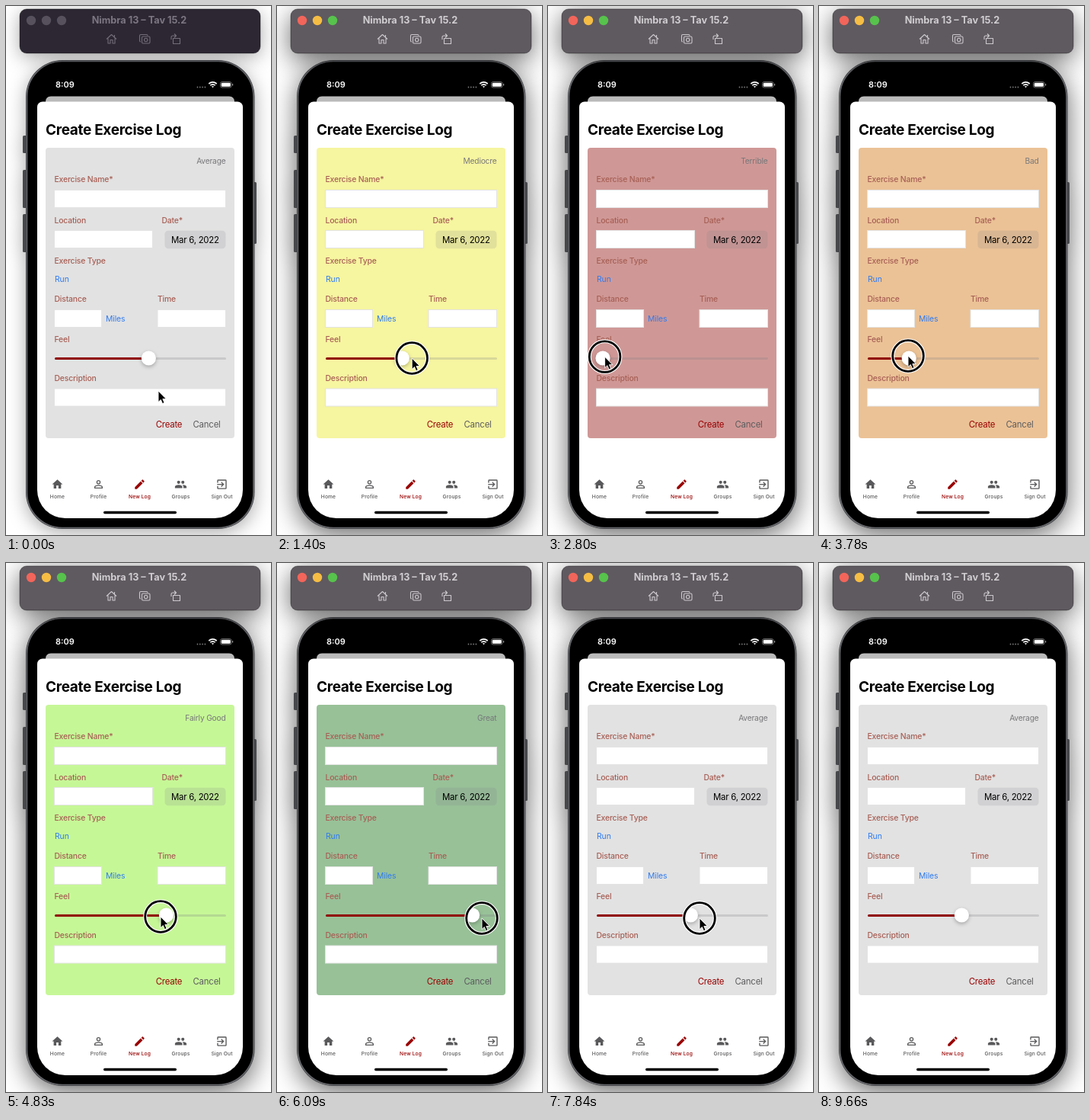
These frames come from a looping animation (348 px wide and 694 px high, 9.8 s). An HTML page:

```html
<!DOCTYPE html>
<html lang="en">
<head>
<meta charset="utf-8">
<title>Exercise log</title>
<style>
  html, body { margin: 0; width: 100%; height: 100%; overflow: hidden; background: #fff; }
  svg { display: block; font: 400 10.4px Inter, "Liberation Sans", sans-serif; }
  .label { font-weight: 500; letter-spacing: -.17px; fill: #a75f55; }
  .link { fill: #2f7bf0; letter-spacing: -.1px; }
  .button { font-size: 11.4px; letter-spacing: -.2px; }
  .field { fill: #fff; stroke: #e3e3e3; }
  .tab { fill: #59595b; }
  .tab text { font-size: 6.7px; font-weight: 500; letter-spacing: .1px; text-anchor: middle; }
  .tab.on { fill: #990000; }
  #bar { fill: #5f5a60; stroke: #0007; stroke-width: .8; }
  #caption { fill: #d0cdd1; font-weight: 700; font-size: 12.7px; text-anchor: middle; }
  #tools { fill: none; stroke: #cbc8cc; stroke-width: 1.1; stroke-linejoin: round; }
  .shade { filter: drop-shadow(0 8px 17px #0009); }
  .idle .shade { filter: drop-shadow(0 5px 12px #0005); }
  .idle #bar { fill: #2c2733; }
  .idle #caption { fill: #7c7682; }
  .idle #tools { stroke: #736d79; }
  .idle #lights circle { fill: #57515d; }
</style>
</head>
<body>
<svg id="stage" width="348" height="694" viewBox="0 0 348 694">
  <rect width="348" height="694" fill="#fff"/>

  <!-- phone body -->
  <g class="shade">
    <g fill="#47484b">
      <rect x="22" y="170" width="7" height="23" rx="1.5"/>
      <rect x="22" y="215" width="7" height="50" rx="1.5"/>
      <rect x="22" y="273" width="7" height="50" rx="1.5"/>
      <rect x="322" y="231" width="7" height="81" rx="1.5"/>
    </g>
    <rect x="26" y="71" width="300.5" height="615" rx="48" fill="#3a3b3e"/>
  </g>
  <rect x="27.5" y="72.5" width="297.5" height="612" rx="46.5" stroke="#66676b" stroke-width="1.6"/>
  <rect x="30" y="75" width="292.5" height="607" rx="44"/>

  <!-- window bar -->
  <g class="shade"><rect id="bar" x="18" y="4" width="316" height="58" rx="9"/></g>
  <g id="lights">
    <circle cx="33" cy="19" r="6.2" fill="#f2655a"/>
    <circle cx="53" cy="19" r="6.2" fill="#f5bd44"/>
    <circle cx="73" cy="19" r="6.2" fill="#57c24c"/>
  </g>
  <text id="caption" x="175" y="23">Nimbra 13 – Tav 15.2</text>
  <g id="tools">
    <path d="M132 43.5L138.5 37.5L145 43.5M134 42.5V49H137V44.5H140V49H143V42.5M142.5 40.5V38"/>
    <path d="M177 47Q175.5 47 175.5 45.5V39Q175.5 37.5 177 37.5H184.5Q186 37.5 186 39"/>
    <rect x="178.5" y="40" width="10.5" height="9" rx="1.5"/>
    <circle cx="183.7" cy="44.5" r="2.2"/>
    <path d="M219.5 42.5H228.5V49.5H219.5ZM217 44V41Q217 39 219 39H223M221 36.5L223.5 39L221 41.5"/>
  </g>

  <!-- status line -->
  <text x="65" y="107.3" font-size="11" font-weight="600" fill="#fff">8:09</text>
  <path d="M251.5 106.5H262" stroke="#777" stroke-width="1.8" stroke-linecap="round" stroke-dasharray="0 3.3"/>
  <g fill="none" stroke="#fff" stroke-width="1.7">
    <path d="M266.3 102Q271.5 97.6 276.7 102M268.3 104.2Q271.5 101.5 274.7 104.2"/>
    <path d="M269.8 105.3H273.2L271.5 107.2Z" fill="#fff" stroke="none"/>
    <rect x="281.5" y="99.5" width="14.5" height="7.5" rx="2.2" stroke="#888" stroke-width=".8"/>
    <path d="M297.6 102V104.6" stroke="#888" stroke-width="1.2"/>
    <rect x="282.7" y="100.7" width="12.1" height="5.1" rx="1.2" fill="#fff" stroke="none"/>
  </g>

  <!-- sheet -->
  <path d="M52 135V126Q52 118.5 59 118.5H293Q300 118.5 300 126V135Z" fill="#bababa"/>
  <path d="M41 132.5a7 7 0 0 1 7-7H304a7 7 0 0 1 7 7V635a37 37 0 0 1-37 37H78a37 37 0 0 1-37-37Z" fill="#fff"/>
  <text x="52" y="169" font-size="19" font-weight="700" letter-spacing="-.33">Create Exercise Log</text>

  <rect id="card" x="52" y="186" width="248" height="381" rx="4"/>
  <text id="mood" x="288.5" y="207.2" font-size="10.2" letter-spacing="-.18" text-anchor="end" fill="#77777a"></text>
  <g class="label">
    <text x="63.5" y="231">Exercise Name*</text>
    <text x="63.5" y="284.5">Location</text>
    <text x="204.5" y="284.5">Date*</text>
    <text x="63.5" y="337.5">Exercise Type</text>
    <text x="63.5" y="387.5">Distance</text>
    <text x="199" y="387.5">Time</text>
    <text x="63.5" y="440.5">Feel</text>
    <text x="63.5" y="491.7">Description</text>
  </g>
  <g class="field">
    <rect x="63.5" y="241.5" width="225" height="23"/>
    <rect x="63.5" y="294.5" width="129" height="23"/>
    <rect x="63.5" y="398.5" width="62" height="23"/>
    <rect x="199" y="398.5" width="89.5" height="23"/>
    <rect x="63.5" y="502" width="225" height="23"/>
  </g>
  <rect x="208.5" y="294.7" width="80" height="23.6" rx="4.5" fill="#767680" fill-opacity=".16"/>
  <text x="217" y="311" font-size="11.4" letter-spacing="-.24">Mar 6, 2022</text>
  <text class="link" x="64" y="361.8">Run</text>
  <text class="link" x="131" y="413.8">Miles</text>
  <text class="button" x="196.7" y="552.6" fill="#990000">Create</text>
  <text class="button" x="245.5" y="552.6" fill="#5c5c5e">Cancel</text>

  <!-- slider -->
  <rect x="64" y="461" width="225" height="3" rx="1.5" fill="#787880" fill-opacity=".24"/>
  <rect id="fill" x="64" y="461" height="3" rx="1.5" fill="#900303"/>
  <circle id="thumb" cy="462" r="9.6" fill="#fff" style="filter:drop-shadow(0 2px 2.5px #0004)"/>

  <g id="tabs"></g>
  <rect x="128" y="662.7" width="96" height="3.5" rx="1.75"/>

  <!-- pointer -->
  <g id="pointer">
    <g id="ring" fill="none">
      <circle r="20.3" stroke="#fff" stroke-width="5"/>
      <circle r="20.3" stroke="#000" stroke-width="2.8"/>
    </g>
    <path d="M0 0V14.6L3.3 11.5L5.5 16.6L8 15.5L5.8 10.5H10.3Z" stroke="#fff" stroke-width=".9"/>
  </g>
</svg>
<script>
const $ = id => document.getElementById(id);
const LOOP = 9800, STEP = 70, FOCUS = 980, RELEASE = 8330, EXIT = 9170;
const FIRST_STOP = 72, STOP_GAP = 23.07, GRIP = 2;

const moods = [
  ["Terrible", "#cf9896"], ["Very Bad", "#ec9a98"], ["Bad", "#ebc296"],
  ["Pretty Bad", "#f6dfa2"], ["Mediocre", "#f6f5a0"], ["Average", "#e2e2e2"],
  ["Fairly Good", "#c6f797"], ["Good", "#a5dfa3"], ["Great", "#98c198"],
  ["Fantastic", "#a2a2f4"]
];

// pointer path: time, x, y
const path = [
  [0, 200, 505], [420, 192, 480], [560, 192, 480], [770, 189, 462], [1260, 189, 462],
  [1960, 130, 462], [2870, 70, 460], [3080, 70, 460], [3780, 117, 459],
  [4830, 203, 464], [6090, 269, 466], [6440, 283, 466], [6580, 283, 466],
  [7840, 199, 466], [7910, 199, 466], [8120, 195, 466], [8820, 195, 466],
  [EXIT, 250, 712], [LOOP, 250, 712]
];

const tabs = [
  ["Home", "M10 20v-6h4v6h5v-8h3L12 3 2 12h3v8z"],
  ["Profile", "M12 5.9a2.1 2.1 0 1 1 0 4.2a2.1 2.1 0 0 1 0-4.2m0 9c2.97 0 6.1 1.46 6.1 2.1v1.1H5.9V17c0-.64 3.13-2.1 6.1-2.1M12 4a4 4 0 1 0 0 8a4 4 0 0 0 0-8zm0 9c-2.67 0-8 1.34-8 4v3h16v-3c0-2.66-5.33-4-8-4z"],
  ["New Log", "M3 17.25V21h3.75L17.81 9.94l-3.75-3.75zM20.71 7.04a1 1 0 0 0 0-1.41l-2.34-2.34a1 1 0 0 0-1.41 0l-1.83 1.83 3.75 3.75z"],
  ["Groups", "M16 5a3 3 0 1 0 0 6a3 3 0 0 0 0-6zM8 5a3 3 0 1 0 0 6a3 3 0 0 0 0-6zm0 8c-2.33 0-7 1.17-7 3.5V19h14v-2.5C15 14.17 10.33 13 8 13zm8 0l-1 .05c1.16.84 2 1.97 2 3.45V19h6v-2.5c0-2.33-4.67-3.5-7-3.5z"],
  ["Sign Out", "M10.09 15.59L11.5 17l5-5-5-5-1.41 1.41L12.67 11H3v2h9.67zM19 3H5a2 2 0 0 0-2 2v4h2V5h14v14H5v-4H3v4a2 2 0 0 0 2 2h14a2 2 0 0 0 2-2V5a2 2 0 0 0-2-2z"]
];
$("tabs").innerHTML = tabs.map(([name, d], i) => `
  <g class="tab${i == 2 ? " on" : ""}" transform="translate(${67.5 + 54 * i} 0)">
    <path transform="translate(-8.3 619.3) scale(.69)" d="${d}"/>
    <text y="645.5">${name}</text>
  </g>`).join("");

function pointerAt(t) {
  const i = path.findIndex(p => p[0] > t);
  const [t0, x0, y0] = path[i - 1], [t1, x1, y1] = path[i];
  const k = (t - t0) / (t1 - t0);
  return [x0 + (x1 - x0) * k, y0 + (y1 - y0) * k];
}

function draw(now) {
  const t = Math.floor(now % LOOP / STEP) * STEP;
  const [x, y] = pointerAt(t);
  const pressed = t >= FOCUS && t < RELEASE;
  const stop = Math.round((x - GRIP - FIRST_STOP) / STOP_GAP);
  const value = pressed ? Math.max(0, Math.min(9, stop)) : 5;
  const thumb = FIRST_STOP + STOP_GAP * value;

  $("stage").classList.toggle("idle", t < FOCUS);
  $("mood").textContent = moods[value][0];
  $("card").setAttribute("fill", moods[value][1]);
  $("thumb").setAttribute("cx", thumb);
  $("fill").setAttribute("width", thumb - 64);
  $("pointer").setAttribute("transform", `translate(${x} ${y})`);
  $("pointer").style.display = t < EXIT ? "" : "none";
  $("ring").style.display = pressed ? "" : "none";
  requestAnimationFrame(draw);
}
draw(0);
</script>
</body>
</html>
```
